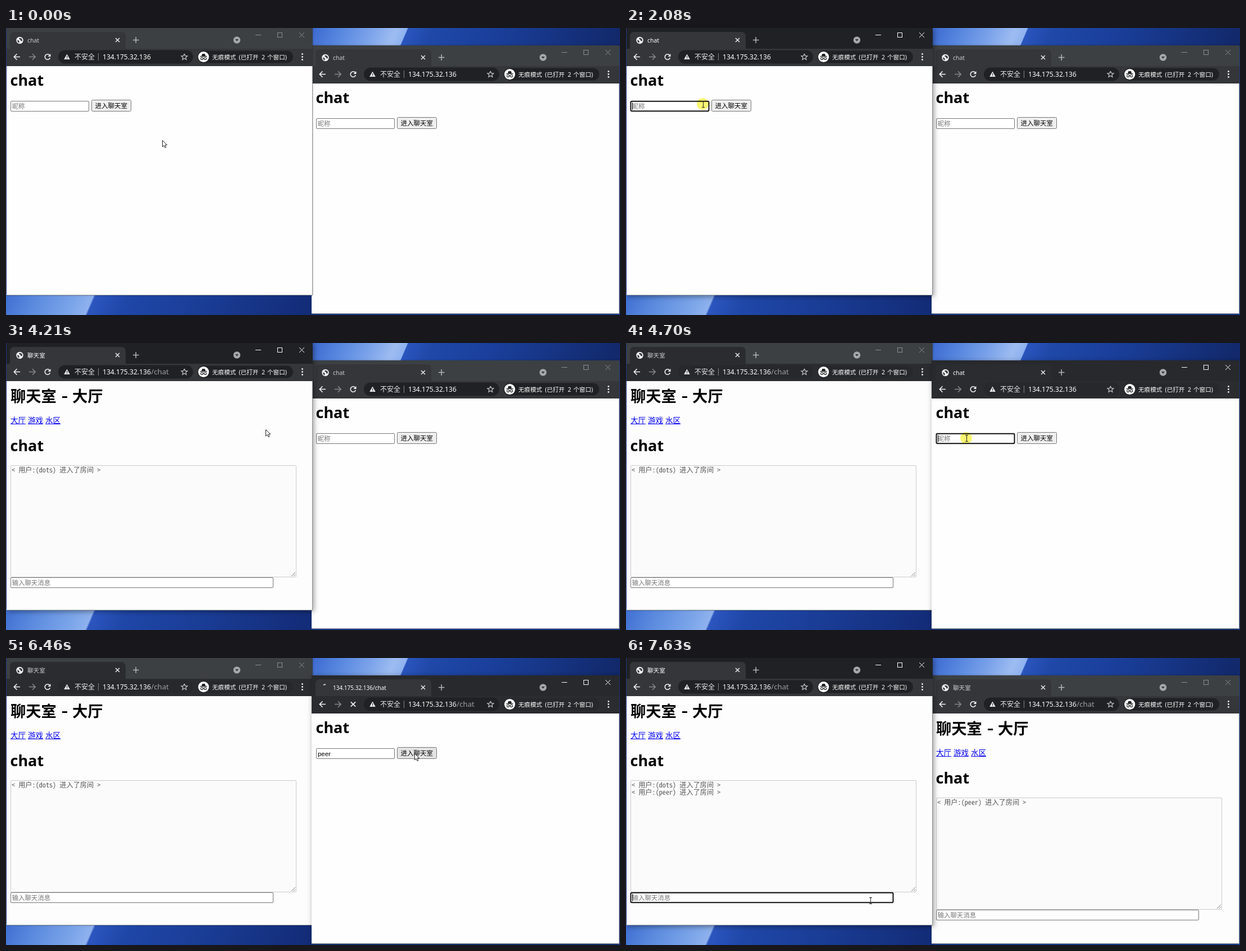
Recreate the animation shown at these times as an HTML page with a canvas. Size 1093 by 512 pixels, loop 8 s.

```html
<!DOCTYPE html>
<html lang="zh-CN">
<head>
<meta charset="utf-8">
<title>chat</title>
<style>
html, body { margin: 0; width: 100%; height: 100%; overflow: hidden; background: #1c3f95; }
canvas { display: block; }
</style>
</head>
<body>
<canvas id="stage" width="1093" height="512"></canvas>
<script>
const ctx = document.getElementById('stage').getContext('2d');
const LOOP = 8000;
const UI = '"Noto Sans", "Noto Sans CJK SC", "Noto Sans CJK", sans-serif';
const FORM = '"Liberation Sans", "Noto Sans CJK SC", "Noto Sans CJK", sans-serif';
const MONO = '"Noto Sans Mono CJK SC", "Noto Sans CJK SC", "Noto Sans Mono", monospace';
const NAMES = ['dots', 'peer'];
const RIGHT = { x: 544, y: 31 };

// Pointer moves: start, end, steps, target x, target y
const MOVES = [
  [1300, 1680, 6, 137, 136],
  [3170, 3340, 3, 175, 137],
  [3980, 4210, 4, 462, 154],
  [4300, 4540, 4, 606, 170],
  [5910, 6160, 4, 727, 170],
  [6710, 7270, 8, 435, 433]
];
const CLICKS = [[2080, 2170], [3410, 3500], [4700, 4770], [6310, 6380], [7560, 7630]];

let fields = [];
let pointer = { x: 278, y: 200 };

const between = (t, a, b) => t >= a && t < b;

function pointerAt(t) {
  let x = 278, y = 200;
  for (const [a, b, n, tx, ty] of MOVES) {
    if (t < a) break;
    const k = Math.floor(Math.min(1, (t - a) / (b - a)) * (n - 1) + 1e-6);
    const p = (k + 1) / n;
    x += (tx - x) * p;
    y += (ty - y) * p;
  }
  return { x: Math.round(x), y: Math.round(y) };
}

function typed(t, start, end, word) {
  if (t < start) return '';
  return word.slice(0, 1 + Math.floor((t - start) / (end - start) * 3 + 1e-6));
}

function rect(x, y, w, h, color) {
  ctx.fillStyle = color;
  ctx.fillRect(x, y, w, h);
}

function round(x, y, w, h, r, fill, stroke, lw = 1) {
  ctx.beginPath();
  ctx.roundRect(x, y, w, h, r);
  if (fill) { ctx.fillStyle = fill; ctx.fill(); }
  if (stroke) { ctx.strokeStyle = stroke; ctx.lineWidth = lw; ctx.stroke(); }
}

function disc(x, y, r, color) {
  ctx.beginPath();
  ctx.arc(x, y, r, 0, 7);
  ctx.fillStyle = color;
  ctx.fill();
}

// Each argument after the width is one polyline: [x, y, x, y, ...]
function lines(color, lw, ...paths) {
  ctx.beginPath();
  for (const p of paths) {
    for (let i = 0; i < p.length; i += 2) ctx[i ? 'lineTo' : 'moveTo'](p[i], p[i + 1]);
  }
  ctx.strokeStyle = color;
  ctx.lineWidth = lw;
  ctx.stroke();
}

function poly(color, ...p) {
  ctx.beginPath();
  for (let i = 0; i < p.length; i += 2) ctx.lineTo(p[i], p[i + 1]);
  ctx.closePath();
  ctx.fillStyle = color;
  ctx.fill();
}

// Text whose capitals are centred on y
function text(s, x, y, size, color, font = UI, weight = 400) {
  ctx.font = `${weight} ${size}px ${font}`;
  ctx.fillStyle = color;
  ctx.fillText(s, x, y + size * 0.37);
  return ctx.measureText(s).width;
}

function cross(x, y, r, color, lw) {
  lines(color, lw, [x - r, y - r, x + r, y + r], [x + r, y - r, x - r, y + r]);
}

// Diagonal wallpaper strip; stops are measured along its top edge
function band(x, y, w, h, stops) {
  const len = w / 1.185;
  const g = ctx.createLinearGradient(x, y, x + len, y + len * 0.43);
  for (const [at, color] of stops) g.addColorStop(at, color);
  rect(x, y, w, h, g);
}

function wallpaper() {
  rect(0, 0, 1093, 512, '#1c3f95');
  band(540, 0, 553, 34, [[0, '#3a66cf'], [0.1, '#5585de'], [0.2, '#7aa2ea'], [0.28, '#9dbcf1'],
    [0.316, '#8fb2f0'], [0.319, '#2a55bd'], [0.4, '#1f48a8'], [0.6, '#1a3f9b'], [1, '#12296b']]);
  band(0, 474, 546, 38, [[0, '#3f6fd2'], [0.12, '#5f8ee0'], [0.24, '#7ea7ea'], [0.288, '#8fb2ee'],
    [0.294, '#2c56bf'], [0.4, '#1f47a8'], [0.6, '#1b3f9a'], [1, '#132c78']]);
}

function globe(x, y, bg) {
  disc(x, y, 6.2, '#f1f3f4');
  poly(bg, x - 4.5, y - 1, x - 1, y + 1, x - 1, y + 4.8, x - 3.6, y + 3);
  poly(bg, x - 0.5, y - 4.6, x + 3.6, y - 3, x + 4.6, y + 1, x + 1.8, y + 1.2, x + 1, y - 1.4, x - 1.4, y - 2);
}

function reload(x, y) {
  ctx.beginPath();
  ctx.arc(x, y, 4.7, 0.35, 5.5);
  ctx.strokeStyle = '#f1f3f4';
  ctx.lineWidth = 1.6;
  ctx.stroke();
  poly('#f1f3f4', x + 5.5, y - 5.6, x + 5.5, y - 0.6, x + 0.5, y - 0.6);
}

function star(x, y) {
  const p = [];
  for (let i = 0; i <= 10; i++) {
    const a = i * Math.PI / 5 - Math.PI / 2, r = i % 2 ? 2.6 : 5.8;
    p.push(x + r * Math.cos(a), y + r * Math.sin(a));
  }
  lines('#c4c7ca', 1.2, p);
}

function privateBadge(x, y) {
  disc(x, y, 9.6, '#fff');
  poly('#202124', x - 3.6, y - 1.4, x - 2.4, y - 5.4, x + 2.4, y - 5.4, x + 3.6, y - 1.4);
  rect(x - 6.3, y - 1.4, 12.6, 1.2, '#202124');
  for (const s of [-1, 1]) {
    ctx.beginPath();
    ctx.arc(x + s * 3, y + 3, 2, 0, 7);
    ctx.strokeStyle = '#202124';
    ctx.lineWidth = 1.1;
    ctx.stroke();
  }
  lines('#202124', 1, [x - 1, y + 2.6, x + 1, y + 2.6]);
}

function chrome(w, s) {
  const e = w.extra, bar = s.bar, ink = s.active ? '#fff' : '#8b8e92';
  rect(w.left, 0, w.w - w.left, 38, s.active ? s.top : '#3c4043');
  round(7, 7, 206, 34, [7, 7, 0, 0], s.tab);
  rect(w.left, 37, w.w - w.left, 31, bar);

  const titleInk = s.active ? '#fff' : '#c9cccf';
  if (s.loading) {
    lines('#f1f3f4', 1.5, [21, 17, 25, 16]);
    text('134.175.32.136/chat', 38, 22, 10, titleInk);
  } else {
    globe(24.5, 22, s.tab);
    text(s.chat ? '聊天室' : 'chat', 38, 22, s.chat ? 10.6 : 10.4, titleInk);
  }
  cross(198.5, 21.5, 3.5, '#e8eaed', 1.5);
  lines('#b4b7ba', 1.5, [226, 21.5, 236.5, 21.5], [231.25, 16, 231.25, 27]);

  disc(411 + e, 21.5, 6.2, '#a5a8ab');
  poly('#303134', 408 + e, 20, 414 + e, 20, 411 + e, 23.6);
  lines(ink, 1, [444 + e, 12.5, 454 + e, 12.5]);
  ctx.strokeRect(483.5 + e, 8.5, 8, 8);
  cross(526.5 + e, 12.5, 4.5, ink, 1);

  lines('#f1f3f4', 1.6, [25, 51.5, 14.5, 51.5], [19.5, 46.2, 14.3, 51.5, 19.5, 56.8]);
  lines('#85888c', 1.6, [41, 51.5, 52, 51.5], [47, 46.2, 52.2, 51.5, 47, 56.8]);
  if (s.loading) cross(74, 51.5, 4.2, '#f1f3f4', 1.7);
  else reload(74, 51.5);

  round(93, 39.5, 240 + e, 24, 12, s.pill);
  poly('#e8eaed', 108.5, 46.5, 113.8, 56, 103.2, 56);
  rect(108, 49.8, 1.2, 3, s.pill);
  rect(108, 53.6, 1.2, 1.2, s.pill);
  text('不安全', 122, 51.5, 12, '#e8eaed');
  rect(164, 45, 1, 13, '#80868b');
  const ip = text('134.175.32.136', 172, 51.3, 12.1, '#fff');
  if (s.path) text('/chat', 172.5 + ip, 51.3, 13.2, '#9aa0a6');
  star(317.5 + e, 51.7);

  ctx.save();
  ctx.translate(e, 0);
  round(341, 40.5, 170, 22, 11, s.badge);
  privateBadge(351.7, 51.5);
  text('无痕模式', 367, 52, 10.6, '#fff');
  text('(已打开', 414.5, 52, 10.6, '#fff');
  text('2', 455, 52, 10.6, '#fff');
  text('个窗口)', 465, 52, 10.6, '#fff');
  ctx.restore();
  for (let i = -1; i < 2; i++) disc(527.5 + e, 51.5 + i * 5, 1.4, '#f1f3f4');
}

function field(w, x, y, width, hint, value, focus) {
  fields.push([w.x + x, w.y + y, width, 19]);
  if (focus) round(x + 0.5, y + 0.7, width - 1, 17.6, 2, '#fff', '#101010', 2);
  else round(x + 0.5, y + 0.5, width - 1, 18, 1.5, '#fff', '#767676');
  const size = 11.4;
  const adv = value ? text(value, x + 3, y + 9.3, size, '#000', FORM) : 0;
  if (!value) text(hint, x + 2.7, y + 9.3, size, '#757575', FORM);
  if (focus) rect(Math.round(x + 3 + adv), y + 3, 1, 13, '#000');
}

function loginPage(w, s) {
  text('chat', 7.5, 93, 27, '#000', UI, 700);
  field(w, 8, 130, 140, '昵称', s.value, s.focus);
  const px = pointer.x - w.x, py = pointer.y - w.y;
  const hover = between(px, 152, 223) && between(py, 128, 149);
  round(152.5, 128.5, 70, 20, 2, hover ? '#e3e3e3' : '#efefef', '#767676');
  text('进入聊天室', 158.5, 139, 11.5, '#000', FORM);
}

function chatPage(w, s) {
  text('聊天室', 8, 94.5, 27.3, '#000', UI, 700);
  rect(100, 95, 9, 3, '#000');
  text('大厅', 118, 94.5, 27.3, '#000', UI, 700);
  ['大厅', '游戏', '水区'].forEach((label, i) => {
    const x = 8 + i * 31;
    text(label, x, 138, 13.6, '#0000ee');
    rect(x, 144, 27, 1, '#0000ee');
  });
  text('chat', 7.5, 183, 27, '#000', UI, 700);
  round(8.5, 218.5, 508, 199, 1.5, '#fbfbfb', '#cbcbcb');
  lines('#808080', 1, [508, 416, 515, 409], [512, 416, 515, 413]);
  s.users.forEach((name, i) => {
    text(`< 用户:(${name}) 进入了房间 >`, 10, 226.5 + i * 12.5, 12.2, '#545454', MONO);
  });
  field(w, 8, 418, 468, '输入聊天消息', '', s.focus);
}

function browser(w, s) {
  ctx.save();
  ctx.translate(w.x, w.y);
  ctx.save();
  ctx.shadowColor = s.active ? 'rgba(0,0,0,.4)' : 'rgba(0,0,0,.3)';
  ctx.shadowBlur = s.active ? 9 : 3;
  ctx.shadowOffsetX = s.active ? 2 : 0;
  ctx.shadowOffsetY = s.active ? 2 : 0;
  rect(w.left, 0, w.w - w.left, w.h, '#fdfdfd');
  ctx.restore();
  rect(w.left, 68, w.w - w.left, w.h - 68, s.chat ? '#fdfdfd' : '#fefefe');
  rect(w.w - 1, 68, 1, w.h - 68, '#8a8d92');
  rect(w.left, w.h - 1, w.w - w.left, 1, '#8a8d92');
  chrome(w, s);
  (s.chat ? chatPage : loginPage)(w, s);
  ctx.restore();
}

function drawPointer(t) {
  const { x, y } = pointer;
  if (CLICKS.some(([a, b]) => between(t, a, b))) {
    ctx.globalCompositeOperation = 'multiply';
    disc(x - 0.5, y - 0.5, 10.5, '#faf672');
    ctx.globalCompositeOperation = 'source-over';
  }
  const beam = fields.some(([fx, fy, w, h]) => between(x, fx, fx + w) && between(y, fy, fy + h));
  if (beam) {
    lines('#222', 1, [x + 0.5, y - 5, x + 0.5, y + 5], [x - 2, y - 5.5, x + 3, y - 5.5], [x - 2, y + 5.5, x + 3, y + 5.5]);
    return;
  }
  const arrow = [0, 0, 0, 11.5, 2.7, 9, 4.6, 13.2, 6.5, 12.3, 4.7, 8.3, 8.2, 8.2, 0, 0]
    .map((v, i) => v + 0.5 + (i % 2 ? y : x));
  poly('#fff', ...arrow);
  lines('#222', 1, arrow);
}

function draw(t) {
  pointer = pointerAt(t);
  fields = [];
  const rightActive = between(t, 4700, 7560);
  const leftChat = t >= 3660, rightChat = t >= 6550;
  const loaded = t >= 6460;
  const bar = rightActive ? '#2b2c2f' : '#35363a';
  const pill = rightActive ? '#27282b' : '#202124';

  const left = {
    active: between(t, 2080, 4700) || t >= 7560,
    top: '#202124', bar, tab: bar, pill, badge: pill,
    loading: between(t, 3500, 3660), chat: leftChat, path: t >= 3500,
    focus: between(t, 2080, 3410) || t >= 7560,
    value: typed(t, 2630, 2900, NAMES[0]),
    users: t < 3820 ? [] : t < 6710 ? [NAMES[0]] : NAMES
  };
  const right = {
    active: rightActive,
    top: '#28292c', bar, tab: rightActive && loaded ? '#35363a' : bar,
    pill: loaded ? '#202124' : pill, badge: pill,
    loading: between(t, 6460, 6550), chat: rightChat, path: loaded,
    focus: between(t, 4700, 6310),
    value: typed(t, 5230, 5510, NAMES[1]),
    users: [NAMES[1]]
  };

  wallpaper();
  const stack = [
    [{ ...RIGHT, left: 0, w: 548, h: 479, extra: 1 }, right],
    [{ x: 0, y: 0, left: 1, w: 546, h: 477, extra: 0 }, left]
  ];
  if (rightActive) stack.reverse();
  for (const [w, s] of stack) browser(w, s);
  drawPointer(t);
}

const start = performance.now();
function tick() {
  draw((performance.now() - start) % LOOP);
  requestAnimationFrame(tick);
}
tick();
</script>
</body>
</html>
```
